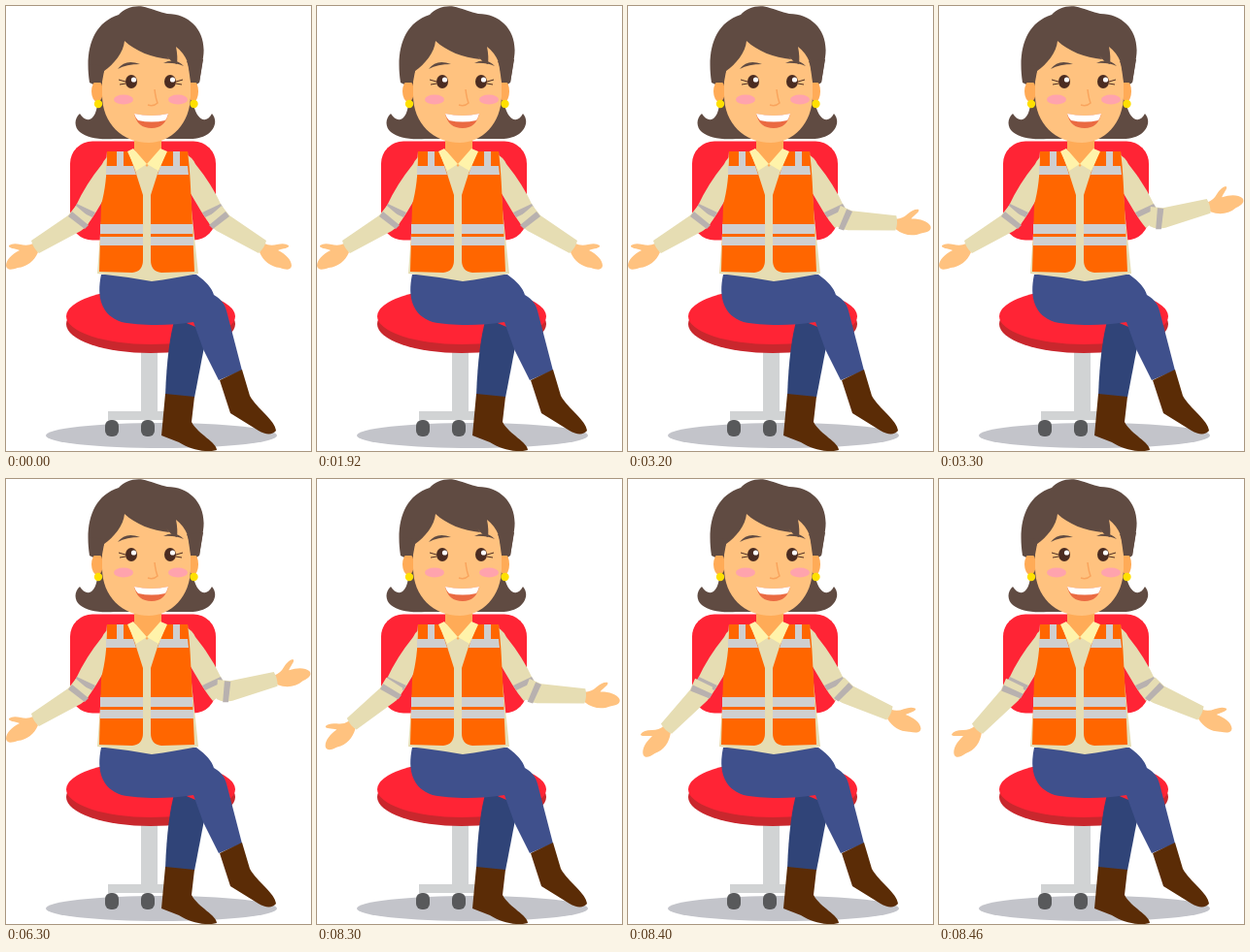
These frames come from a looping animation (314 px wide and 459 px high, 8500 ms). An HTML page:

```html
<!DOCTYPE html>
<html lang="en">
<head>
<meta charset="utf-8">
<title>Seated woman in a safety vest</title>
<style>
html, body { margin: 0; width: 100%; height: 100%; overflow: hidden; background: #fff; }
svg { display: block; width: 314px; height: 459px; }
.red { fill: #ff2435; }
.metal { fill: #d1d3d4; }
.wheel { fill: #58595b; }
.jeans { fill: #3f508c; }
.boot { fill: #5b2c06; }
.shirt { fill: #e6ddb3; }
.vest { fill: #ff6600; }
.tape { fill: #cfcfd0; }
.band { fill: #b8b1af; }
.hair { fill: #604b42; }
.skin { fill: #ffc27f; }
.shade { fill: #ffab57; }
.eye { fill: #4b2c21; }
.blush { fill: #ffa3ad; }
.lash { fill: none; stroke: #4b2c21; stroke-width: 1; }
</style>
</head>
<body>
<svg viewBox="0 0 314 459">
  <defs>
    <g id="sleeve">
      <path class="shirt" d="M184 152Q192 156 195 163 212 184 222 206L229 217 213 229Q207 222 201 212L188 190Z"/>
      <path class="band" d="M202 213L221 204 224 209 205 218Z"/>
    </g>
    <g id="forearm">
      <path class="skin" d="M266 245Q272 248 279 246 287 244 291 247C292 250 285 250 280 252C288 256 294 262 294 268 293 273 288 272 282 270 272 269 265 263 261 254Z"/>
      <path class="shirt" d="M222 206L230 216 268 242Q266 250 260 255L217 232Q209 227 207 219Z"/>
      <path class="band" d="M209 226L226 212 230 217 213 230Z"/>
    </g>
  </defs>

  <ellipse cx="160" cy="443" rx="119" ry="13" fill="#c3c4ca"/>
  <rect class="red" x="66" y="139.5" width="150" height="102" rx="23"/>
  <path class="metal" d="M139 350H156V418H166V427H105V418H139Z"/>
  <rect class="wheel" x="102" y="427" width="14" height="17" rx="6"/>
  <rect class="wheel" x="139" y="427" width="14" height="17" rx="6"/>
  <ellipse cx="149" cy="328" rx="87" ry="30" fill="#c9272d"/>
  <ellipse class="red" cx="149" cy="320" rx="87" ry="29"/>

  <path d="M174 322Q166 348 164 402L194 404 207 336Z" fill="#304478"/>
  <path class="boot" d="M164 400L194 403 191 429C198 442 217 450 217 458 208 461 190 458 178 450L160 443Z"/>
  <path class="jeans" d="M98 277H196C206 284 212 291 214 298 223 303 226 309 228 318L243 376 219 386 203 354 193 326C170 330 138 330 119 326 98 319 93 300 98 277Z"/>
  <path class="boot" d="M220 386L243 375 251 402C258 415 277 427 278 438 274 443 267 442 260 438L231 420Z"/>

  <g id="right">
    <use href="#sleeve"/>
    <use class="turning" href="#forearm"/>
  </g>
  <g id="left" transform="matrix(-1 0 0 1 294 0)">
    <use href="#sleeve"/>
    <use class="turning" href="#forearm"/>
  </g>

  <path class="shirt" d="M104 150H187L191 210 198 276Q172 281 150 284 122 279 94 276L99 208Z"/>
  <path class="vest" d="M104 150H126L134 173 141 195V262Q141 274 130 275L96 274 98 205C102 190 104 175 104 150Z"/>
  <path class="vest" d="M187 150H165L156 173 149 195V262Q149 274 160 275L194 274 191 205C190 190 190 175 187 150Z"/>
  <path class="tape" d="M114 150H121V165H131L134 174H103V165H114ZM172 150H179V165H187L188 174H156L159 165H172Z"/>
  <path class="tape" d="M97 225H141V235H97ZM97 238H141V247H97ZM149 225H192V235H149ZM149 238H193V247H149Z"/>

  <path class="hair" d="M86 79C81 47 88 18 116 9 123 1 136-2 146 2 156 5 161 7 166 8 190 8 207 27 203 53L199 79 193 83V102C197 118 206 122 212 111 218 118 215 127 208 132 199 138 190 137 178 137H112C94 138 84 136 76 130 70 125 70 116 76 111 83 122 92 118 94 102V83Z"/>
  <path class="shade" d="M132 128H160V148L145 166 132 148Z"/>
  <path d="M131 147L145 163 134 170 125 150ZM159 147L145 163 157 170 166 150Z" fill="#fff3aa"/>
  <ellipse class="shade" cx="94" cy="88" rx="6" ry="11"/>
  <ellipse class="shade" cx="193" cy="88" rx="5" ry="11"/>
  <path class="skin" d="M101 67C111 60 121 48 122 36 134 47 150 53 168 55L165 51Q170 58 176 60 177 52 175 42 183 48 187 58L190 78V92C190 121 170 141 147 141 120 141 99 121 99 92V78Z"/>
  <path class="hair" d="M86 60L103 62Q99 70 98 79H86ZM203 55L186 57Q190 66 190 79H199Z"/>
  <circle cx="95" cy="101" r="4.2" fill="#ffe000"/>
  <circle cx="193.500" cy="101" r="4.200" fill="#ffe000"/>
  <ellipse class="blush" cx="121" cy="96.500" rx="10" ry="5"/>
  <ellipse class="blush" cx="177" cy="96.500" rx="10" ry="5"/>
  <ellipse class="eye" cx="129" cy="78" rx="6" ry="7"/>
  <ellipse class="eye" cx="169" cy="78" rx="6" ry="7"/>
  <circle cx="131.500" cy="76" r="2.600" fill="#fff"/>
  <circle cx="171.500" cy="76" r="2.600" fill="#fff"/>
  <path class="lash" d="M116 76L123 78M117 81L123 80M182 76L175 78M181 81L175 80"/>
  <path class="hair" d="M115 65Q123 54 138 60 124 60 115 65ZM183 62Q174 53 162 59 174 58 183 62Z"/>
  <path d="M153 86Q154 95 156 100 152 104 146 102" fill="none" stroke="#f9a45d" stroke-width="1.500"/>
  <path d="M132 111Q150 115 167 111C165 121 159 126 150 126 140 126 134 121 132 111Z" fill="#ea6a42"/>
  <path d="M132 111Q150 115 167 111 166 115 164 118 150 121 136 118 133 115 132 111Z" fill="#fff"/>
</svg>
<script>
const LOOP = 8500;

// Forearm turn in degrees and shift in pixels about the elbow.
const pose = (turn, dx, dy) => `translate(${dx} ${dy}) rotate(${turn} 217 218)`;
const rest = pose(0, 0, 0);
const level = pose(-28, 3, 1);
const steps = [
  { until: 3200, right: rest, left: rest },
  { until: 3300, right: level, left: rest },
  { until: 8300, right: pose(-46, 6, 1), left: rest },
  { until: 8400, right: level, left: pose(8, -1, -2) },
  { until: LOOP, right: pose(-7, 2, -1), left: pose(15, 0, -2) }
];

const rightForearm = document.querySelector("#right .turning");
const leftForearm = document.querySelector("#left .turning");

function tick() {
  const time = performance.now() % LOOP;
  const { right, left } = steps.find(step => time < step.until);
  rightForearm.setAttribute("transform", right);
  leftForearm.setAttribute("transform", left);
  requestAnimationFrame(tick);
}
tick();
</script>
</body>
</html>
```
